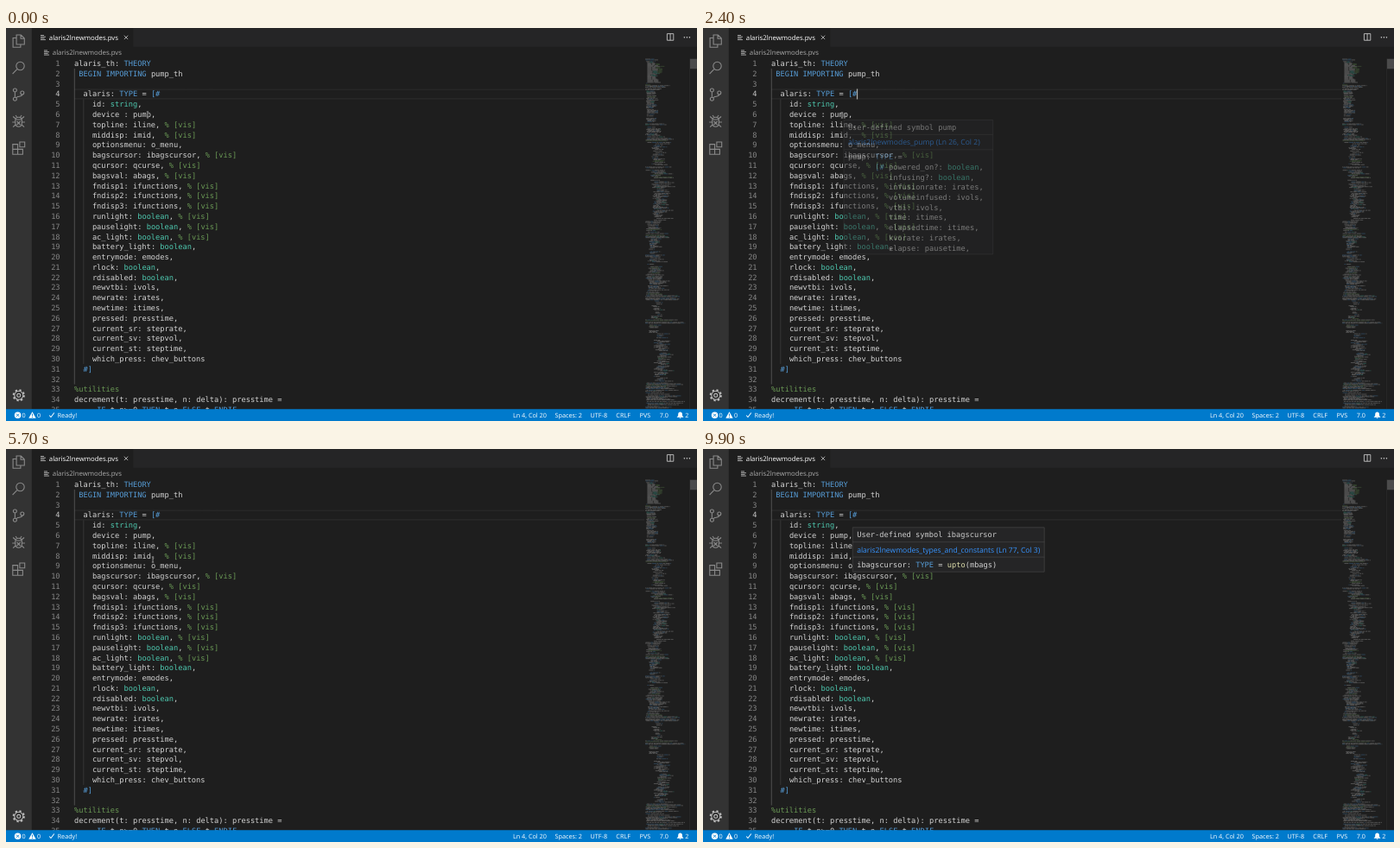
Animation of 800 by 455 pixels, one loop 10 s. Source, as an HTML page:

```html
<!DOCTYPE html>
<html lang="en">
<head>
<meta charset="utf-8">
<title>Editor hover hints</title>
<style>
  html, body { margin: 0; width: 100%; height: 100%; overflow: hidden; background: #1e1e1e; }
  svg { display: block; width: 800px; height: 455px; }
  text { white-space: pre; text-rendering: geometricPrecision; }
  .mono { font-family: "DejaVu Sans Mono", monospace; font-size: 8.69px; }
  .ui { font-family: "Open Sans", "Noto Sans", sans-serif; }
</style>
</head>
<body>
<svg id="screen" viewBox="0 0 800 455"></svg>
<script>
const LOOP = 10000, SCALE = .6205, CHAR = 8.428 * SCALE, LINE = 19 * SCALE, TOP = 35.25, LEFT = 79;
const FG = '#d4d4d4', BLUE = '#569cd6', TEAL = '#4ec9b0', GREEN = '#6a9955';

function add(parent, tag, attrs, content) {
  const el = document.createElementNS('http://www.w3.org/2000/svg', tag);
  for (const k in attrs) el.setAttribute(k, attrs[k]);
  if (content !== undefined) el.textContent = content;
  parent.appendChild(el);
  return el;
}
// The invisible turn keeps text baselines from snapping to whole pixels.
const stage = add(document.getElementById('screen'), 'g', { transform: 'rotate(.002)' });

const rect = (p, x, y, width, height, fill, more) =>
  add(p, 'rect', { x, y, width, height, fill, ...more });
const stroke = (p, d, color, width = 1, more) =>
  add(p, 'path', { d, fill: 'none', stroke: color, 'stroke-width': width, ...more });
const label = (p, x, y, str, size, fill) =>
  add(p, 'text', { x, y, fill, class: 'ui', 'font-size': size }, str);
const mono = (p, x, y, str, fill, more) =>
  add(p, 'text', { x, y, fill, class: 'mono', ...more }, str);

function tokenColor(s) {
  if (s[0] === '%') return GREEN;
  if (/^(THEORY|BEGIN|IMPORTING|TYPE|IF|THEN|ELSE|ENDIF|\[#|#\])$/.test(s)) return BLUE;
  if (/^(string|boolean)$/.test(s)) return TEAL;
  return s === 'upto' ? '#dcdcaa' : FG;
}
function tokens(str) {
  return [...str.matchAll(/%.*|\w+\??|\[#|#\]|[^\s\w]+/g)]
    .map(m => ({ s: m[0], col: m.index, color: tokenColor(m[0]) }));
}
function code(p, x, y, str) {
  for (const t of tokens(str)) mono(p, x + t.col * CHAR, y, t.s, t.color);
}

const SOURCE = `alaris_th: THEORY
 BEGIN IMPORTING pump_th

  alaris: TYPE = [#
    id: string,
    device : pump,
    topline: iline, % [vis]
    middisp: imid,  % [vis]
    optionsmenu: o_menu,
    bagscursor: ibagscursor, % [vis]
    qcursor: qcurse, % [vis]
    bagsval: abags, % [vis]
    fndisp1: ifunctions, % [vis]
    fndisp2: ifunctions, % [vis]
    fndisp3: ifunctions, % [vis]
    runlight: boolean, % [vis]
    pauselight: boolean, % [vis]
    ac_light: boolean, % [vis]
    battery_light: boolean,
    entrymode: emodes,
    rlock: boolean,
    rdisabled: boolean,
    newvtbi: ivols,
    newrate: irates,
    newtime: itimes,
    pressed: presstime,
    current_sr: steprate,
    current_sv: stepvol,
    current_st: steptime,
    which_press: chev_buttons
  #]

%utilities
decrement(t: presstime, n: delta): presstime =
     IF t-n>=0 THEN t-n ELSE t ENDIF`.split('\n');

function drawEditor() {
  rect(stage, 0, 0, 800, 455, '#1e1e1e');
  const y4 = TOP + 3 * LINE;
  stroke(stage, `M${LEFT} ${y4 + .6}H739M${LEFT} ${y4 + LINE - .6}H739`, '#2b2b2b', 1.2);
  stroke(stage, `M79.3 ${TOP + LINE}V${TOP + 32 * LINE}`, '#666', .7);
  stroke(stage, `M89.8 ${TOP + 4 * LINE}V${TOP + 30 * LINE}`, '#404040', .7);
  SOURCE.forEach((line, i) => {
    const y = TOP + (i + .5) * LINE + 2.95;
    mono(stage, 62.6, y, i + 1, i === 3 ? '#c6c6c6' : '#858585', { 'text-anchor': 'end' });
    code(stage, LEFT, y, line);
  });
}

function drawMinimap() {
  const X = 740, W = .621, PITCH = .93, paths = {};
  let seed = 7, y = 36;
  const rnd = () => (seed = (seed * 16807) % 2147483647) / 2147483647;
  const dash = (col, len, color) => {
    const x = X + col * W, w = Math.min(len * W, 791 - x);
    if (w > 0) paths[color] = (paths[color] || '') +
      `M${x.toFixed(2)} ${y.toFixed(2)}h${w.toFixed(2)}`;
  };
  for (const line of SOURCE) {
    for (const t of tokens(line)) dash(t.col, t.s.length, t.color);
    y += PITCH;
  }
  // until y, least indent, indent spread, least length, length spread
  const blocks = [
    [73, 0, 2, 20, 20], [111, 2, 3, 12, 10], [113, 0, 1, 30, 10],
    [126, 0, 6, 8, 22], [134, 1, 4, 32, 26], [160, 12, 8, 8, 20], [166, 0, 3, 30, 30],
    [186, 10, 10, 12, 30], [224, 14, 10, 8, 24], [226, 0, 2, 20, 10],
    [238, 2, 6, 14, 12], [244, 0, 2, 30, 16], [262, 6, 8, 8, 14], [266, 0, 2, 24, 20],
    [285, 4, 10, 8, 22], [292, 0, 6, 14, 20], [310, 2, 8, 18, 22], [316, 0, 3, 50, 28],
    [338, 10, 14, 6, 16], [344, 0, 2, 40, 36], [354, 4, 8, 10, 20],
    [411, 16, 14, 10, 16], [424, 0, 5, 30, 40], [441, 0, 6, 20, 55]
  ];
  for (const [end, indent, spread, least, extra] of blocks) {
    while (y < end - PITCH) {
      let col = Math.floor(indent + rnd() * spread);
      const stop = col + least + rnd() * extra;
      const comment = rnd() < .05, blank = rnd() < .2;
      while (col < stop && !blank) {
        const len = 2 + Math.floor(rnd() * 8), pick = rnd();
        dash(col, Math.min(len, stop - col),
          comment ? GREEN : pick < .16 ? BLUE : pick < .2 ? TEAL : FG);
        col += len + 1;
      }
      y += PITCH;
    }
    y = end;
  }
  const map = add(stage, 'g', { opacity: .5 });
  for (const color in paths) stroke(map, paths[color], color, .55);
  stroke(stage, 'M791.5 35.4V441', '#303030', .6);
  rect(stage, 792, 35.6, 8, 11.6, '#4b4b4b');
}

function listIcon(x, y) {
  stroke(stage, `M${x} ${y - 2.5}h4M${x} ${y - .8}h6M${x} ${y + .9}h4.6M${x} ${y + 2.6}h6`, '#c5c5c5', .8);
}

function drawFrame() {
  rect(stage, 29.8, 0, 771, 21.75, '#252526');
  rect(stage, 29.8, 0, 117.5, 22, '#1e1e1e');
  listIcon(40, 11);
  label(stage, 49.8, 13.6, 'alaris2lnewmodes.pvs', 7.8, '#fff');
  stroke(stage, 'M136.8 8.7l4.4 4.4M141.2 8.7l-4.4 4.4', '#d0d0d0', .8);
  listIcon(44, 28.5);
  label(stage, 53.8, 31.1, 'alaris2lnewmodes.pvs', 7.8, '#a9a9a9');
  stroke(stage, 'M765.4 6.6h7.4v7.6h-7.4zM769.1 6.6v7.6', '#c5c5c5', .9);
  for (const x of [785.4, 788.4, 791.4]) add(stage, 'circle', { cx: x, cy: 10.8, r: .8, fill: '#c5c5c5' });

  rect(stage, 0, 0, 29.8, 441.5, '#333');
  const icons = [
    [15, 'M-2.5-7h5.2l4 4v7h-9.2zM2.5-7v4.2h4.2M-2.5-3.5h-4V7.2h8.8V4'],
    [46, 'M6.6-2a4.7 4.7 0 1 1-9.4 0a4.7 4.7 0 1 1 9.4 0M-1.5 1.4L-7 7.2'],
    [77, 'M-2.2-5a2 2 0 1 1-4 0a2 2 0 1 1 4 0M-2.2 5.2a2 2 0 1 1-4 0a2 2 0 1 1 4 0M6.2-2a2 2 0 1 1-4 0a2 2 0 1 1 4 0M-4.2-3v6.2M4.2 0c0 3-5 1.5-7 3.6'],
    [108, 'M-3.8-1c0-5 7.6-5 7.6 0v3c0 5.6-7.6 5.6-7.6 0zM-3.8-2h7.6M-3.8 1h-3.5M3.8 1h3.5M-3.5-3l-3-2.5M3.5-3l3-2.5M-3.5 4l-3 2.7M3.5 4l3 2.7M-2-5l-1.5-2M2-5l1.5-2M-2 0l4 4M2 0l-4 4'],
    [139, 'M-6.8-4.4h5.8v5.8h-5.8zM-6.8 1.4h5.8v5.8h-5.8zM-1 1.4h5.8v5.8h-5.8zM1.3-7h5.8v5.8H1.3z']
  ];
  for (const [y, d] of icons)
    stroke(stage, d, '#8a8a8a', 1.1, { transform: `translate(14.6 ${y})` });
  const gear = add(stage, 'g', { transform: 'translate(14.8 425.3)', fill: 'none', stroke: '#c2c2c2' });
  add(gear, 'circle', { r: 5, 'stroke-width': 1 });
  add(gear, 'circle', { r: 6.2, 'stroke-width': 1.8, 'stroke-dasharray': '2.2 2.67' });
  add(gear, 'circle', { r: 2, 'stroke-width': 1 });

  rect(stage, 0, 441.3, 800, 13.7, '#007acc');
  const solid = d => add(stage, 'path', { d, fill: '#fff' });
  solid('M17.4 448.2a3.8 3.8 0 1 1-7.6 0a3.8 3.8 0 1 1 7.6 0');
  solid('M30.5 444.2l4.2 7.6h-8.4z');
  solid('M776.6 450.6h8l-1.6-1.9v-1.6c0-3.6-4.8-3.6-4.8 0v1.6zM779.4 451.2h2.4l-1.2 1z');
  stroke(stage, 'M12 446.6l3.2 3.2M15.2 446.6l-3.2 3.2M30.5 446.6v2.7M30.5 450v.9', '#007acc', .9);
  stroke(stage, 'M50.2 448.5l1.8 2l3.8-5', '#fff', 1);
  const items = [[18.6, '0'], [36, '0'], [59.6, 'Ready!'], [587, 'Ln 4, Col 20'], [635.5, 'Spaces: 2'],
    [676.6, 'UTF-8'], [706.4, 'CRLF'], [733.6, 'PVS'], [756.8, '7.0'], [786.4, '2']];
  for (const [x, str] of items) label(stage, x, 450.9, str, 7.25, '#fff');
}

function makeHint({ x, y, w, h = 52, title, link, body }) {
  const g = add(stage, 'g', { transform: `translate(${x} ${y})` });
  rect(g, .3, .3, w - .6, h - .6, '#252526', { stroke: '#454545', 'stroke-width': .7 });
  stroke(g, `M0 17.2H${w}M0 34.6H${w}`, '#454545', .7);
  mono(g, 5.2, 11.5, title, '#ccc');
  label(g, 5.2, 29, link, 8.55, '#3794ff');
  body.forEach((line, i) => code(g, 5.2, 46 + i * 11.7, line));
  return g;
}

const TYPES = 'alaris2lnewmodes_types_and_constants';
const hints = [
  { on: 800, off: 1500, x: 142, y: 31, w: 200, title: 'Prelude symbol string',
    link: 'prelude (Ln 2124, Col 2)', body: ['string: TYPE = finite_sequence[char]'] },
  { on: 2400, off: 3800, x: 162.7, y: 106.2, w: 173.3, h: 156, title: 'User-defined symbol pump',
    link: 'alaris2lnewmodes_pump (Ln 26, Col 2)',
    body: ['pump: TYPE =', '      [# powered_on?: boolean,',
      ...['infusing?: boolean', 'infusionrate: irates', 'volumeinfused: ivols', 'vtbi: ivols', 'time: itimes',
        'elapsedtime: itimes', 'kvorate: irates', 'elapse: pausetime'].map(s => ' '.repeat(9) + s + ',')] },
  { on: 4400, off: 5600, x: 152.6, y: 66.3, w: 222.5, title: 'User-defined symbol imid',
    link: TYPES + ' (Ln 65, Col 3)', body: ['imid: TYPE = {dvol, dtime, dnone}'] },
  { on: 6300, off: 7800, x: 178.6, y: 78.4, w: 222.5, title: 'User-defined symbol o_menu',
    link: TYPES + ' (Ln 71, Col 3)', body: ['o_menu: TYPE = upto(maxopt)'] },
  { on: 8800, off: LOOP, x: 173, y: 90.5, w: 222.5, title: 'User-defined symbol ibagscursor',
    link: TYPES + ' (Ln 77, Col 3)', body: ['ibagscursor: TYPE = upto(mbags)'] }
];

// time, x, y
const route = [[0, 164, 100], [100, 164, 100], [500, 143, 90], [1400, 143, 90], [1700, 151, 97], [2100, 161, 101],
  [3600, 161, 101], [4000, 156, 119], [4300, 154, 122], [5500, 154, 122], [5700, 170, 128],
  [6000, 180, 136], [7700, 180, 136], [8300, 179, 147], [8500, 176, 147.5], [LOOP, 176, 147.5]];

function pointerAt(t) {
  const i = route.findIndex(p => p[0] > t);
  const [t0, x0, y0] = route[i - 1], [t1, x1, y1] = route[i];
  const k = (t - t0) / (t1 - t0);
  return [x0 + (x1 - x0) * k, y0 + (y1 - y0) * k];
}

drawEditor();
drawMinimap();
drawFrame();
const caret = rect(stage, 177.9, TOP + 3 * LINE, 1.25, LINE, '#aeafad');
for (const h of hints) h.el = makeHint(h);
const pointer = add(stage, 'g', {});
const beam = 'M-1.2-3.1H1.2M0-3.1V3.1M-1.2 3.1H1.2';
stroke(pointer, beam, '#1e1e1e', 1.4);
stroke(pointer, beam, '#d0d0d0', .65);

function draw(now) {
  const t = Math.floor((now % LOOP) / 100) * 100;
  caret.style.visibility = (t + 800) % 1000 < 500 ? 'visible' : 'hidden';
  for (const h of hints) {
    const shown = t >= h.on && t < h.off;
    h.el.style.opacity = shown ? Math.min(1, (t - h.on + 100) / 200) : 0;
  }
  pointer.setAttribute('transform', `translate(${pointerAt(t)})`);
}
const start = performance.now();
function tick() {
  draw(performance.now() - start);
  requestAnimationFrame(tick);
}
tick();
</script>
</body>
</html>
```
